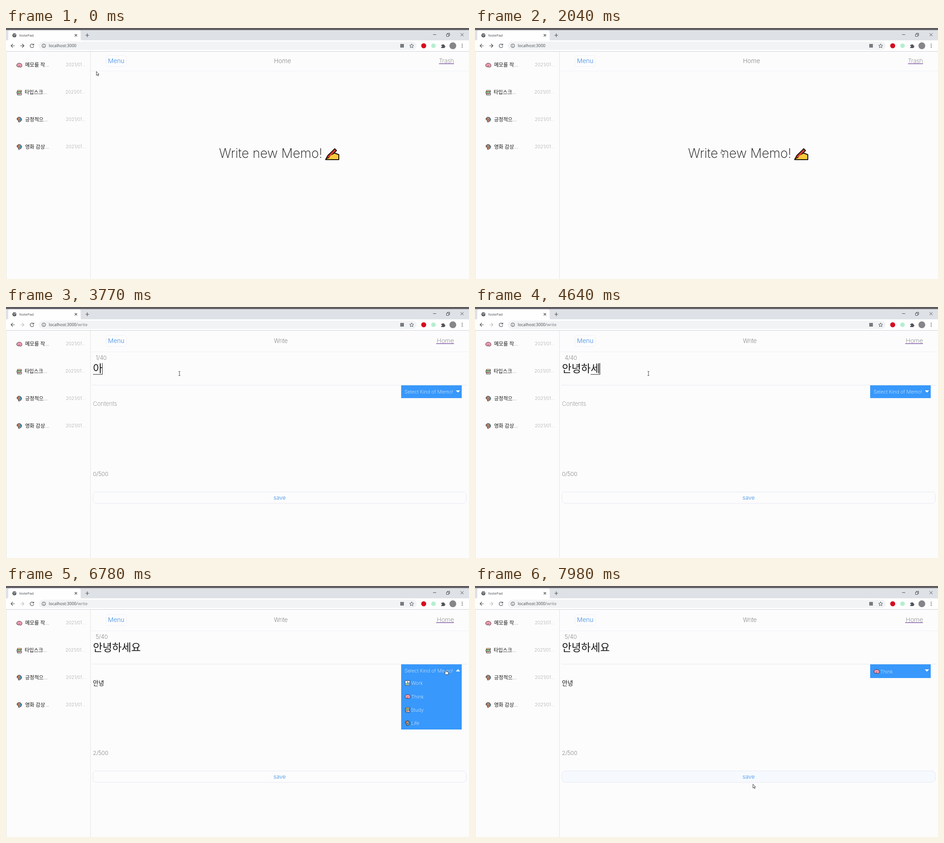
Animation, 1017 px wide and 551 px high, one loop 8 s. Source, as an HTML page:

```html
<!DOCTYPE html>
<html lang="ko">
<head>
<meta charset="utf-8">
<title>NotePad</title>
<style>
html, body { margin: 0; width: 100%; height: 100%; overflow: hidden; background: #fcfcfd; }
svg.stage { display: block; width: 100vw; height: 100vh; }
text { font-family: Inter, sans-serif; font-weight: 200; font-size: 13px; fill: #555; white-space: pre; }
.ui { font-family: "Open Sans", sans-serif; font-weight: 400; font-size: 9px; fill: #45484c; }
.ko { font-family: "Noto Sans CJK KR", "Noto Sans CJK JP", "Noto Sans CJK", sans-serif; font-weight: 300; font-size: 11px; fill: #151515; }
.soft { fill: #aaa; }
.date { font-size: 10px; fill: #888; }
.blue { fill: #3a8be4; font-weight: 300; }
.link { fill: #666; text-anchor: end; }
.rule { stroke: #551a8b; }
.hint { fill: #777; }
.pick text { font-size: 10.9px; fill: #fff; }
.thin { fill: none; stroke: #505357; stroke-width: 1.2; }
.edge { fill: none; stroke: #f0f1f6; }

.cursor { animation: travel 8s infinite ease-in-out; }
.home, .write, .closed, .open, .picked, .arrow, .beam, .hand { animation: 8s infinite step-end; }
.home { animation-name: home; }
.write { animation-name: write; }
.closed { animation-name: closed; }
.open { animation-name: open; }
.picked { animation-name: picked; }
.arrow { animation-name: arrow; }
.beam { animation-name: beam; }
.hand { animation-name: hand; }
.save { animation: hover 8s infinite linear; }

@keyframes home { 0% { opacity: 1 } 30%, 100% { opacity: 0 } }
@keyframes write { 0% { opacity: 0 } 30%, 100% { opacity: 1 } }
@keyframes closed { 0% { opacity: 1 } 83%, 100% { opacity: 0 } }
@keyframes open { 0% { opacity: 0 } 83% { opacity: 1 } 90.5%, 100% { opacity: 0 } }
@keyframes picked { 0% { opacity: 0 } 90.5%, 100% { opacity: 1 } }
@keyframes arrow { 0% { opacity: 1 } 18.5% { opacity: 0 } 97%, 100% { opacity: 1 } }
@keyframes beam { 0% { opacity: 0 } 30% { opacity: 1 } 78.5% { opacity: 0 } 92.5% { opacity: 1 } 97%, 100% { opacity: 0 } }
@keyframes hand { 0% { opacity: 0 } 18.5% { opacity: 1 } 30% { opacity: 0 } 78.5% { opacity: 1 } 92.5%, 100% { opacity: 0 } }
@keyframes hover { 0%, 97.5% { fill: #fcfcfd } 99%, 100% { fill: #f6fafe } }
@keyframes travel {
  0% { transform: translate(198px, 95px); animation-timing-function: ease-in }
  14.25% { transform: translate(398px, 184px); animation-timing-function: ease-out }
  21% { transform: translate(545px, 268px) }
  30% { transform: translate(540px, 266px) }
  33.9% { transform: translate(530px, 226px) }
  40%, 70% { transform: translate(381px, 146px); animation-timing-function: ease-in }
  73.5% { transform: translate(568px, 123px); animation-timing-function: ease-out }
  81.5% { transform: translate(960px, 186px) }
  84.75% { transform: translate(966px, 184px) }
  88.5% { transform: translate(912px, 240px) }
  91.5% { transform: translate(908px, 240px) }
  99.75%, 100% { transform: translate(610px, 434.5px) }
}
</style>
</head>
<body>
<svg class="stage" viewBox="0 0 1017 551">
  <defs>
    <g id="brain">
      <path d="M.8 7C0 4 2 1.300 6 1.300S12 3.500 12 6.500 10 10 8.500 10 7 9 5 9.300 1.200 9 .8 7Z" fill="#f4a3b8" stroke="#3a2028"/>
      <path d="M3 5.500q1.500-2 3 0t3-.8M4 7.500h4" fill="none" stroke="#b9647c" stroke-width=".8"/>
    </g>
    <g id="books">
      <path d="M2 1h9v3H2zM1 4h9v3.500H1zM2 7.500h9V11H2z" fill="#fff" stroke="#222"/>
      <path d="M2 1.800h8" stroke="#e9a025"/><path d="M1.500 5h6" stroke="#45ad4b" stroke-width="1.500"/><path d="M2.500 8.800h6" stroke="#dd5548"/>
    </g>
    <g id="person">
      <path d="M1 3.500 4 .8l4.500.3 3 3.400-.7 4L6.500 11.500 4 11 4.500 8 1.500 6.500Z" fill="#dc8c68" stroke="#242832"/>
      <path d="M6.500 1.500 10.800 4v4L8 9.500Z" fill="#3b95b3"/><path d="M2 4h3M5 6.500l2 1" stroke="#3c2625"/>
    </g>
    <g id="chart">
      <path d="M.8.800h10.400v10.400H.8Z" fill="#fff" stroke="#333"/>
      <path d="M3 10V6" stroke="#40a845" stroke-width="2"/><path d="M6 10V2.500" stroke="#df463c" stroke-width="2"/><path d="M9 10V4.500" stroke="#287cc9" stroke-width="2"/>
    </g>
  </defs>

  <!-- Browser window -->
  <rect width="1017" height="551" fill="#fcfcfd"/>
  <rect width="1017" height="27" fill="#dee1e6"/>
  <rect width="1017" height="4.500" fill="#5d5a60"/>
  <path d="M3 27q2 0 2-3V9q0-4 4-4h151q4 0 4 4v15q0 3 2 3v24H0V27Z" fill="#fefefe"/>
  <rect y="27" width="1017" height="24" fill="#fefefe"/>
  <rect x="72" y="30" width="830" height="18" rx="9" fill="#f1f3f4"/>
  <path d="M0 51.500h1017" stroke="#d0d2d4"/>
  <circle cx="18.500" cy="16" r="4.500" fill="#55595e"/>
  <path d="M15.500 14l2 1.500 1 2.500M19 12.500l.5 2 3 1" fill="none" stroke="#fff"/>
  <text class="ui" x="29" y="19" style="font-size:7.900px">NotePad</text>
  <g class="thin">
    <path d="M151 13.500l5 5m0-5l-5 5M174.500 16h8m-4-4v8"/>
    <path d="M938 14.500h7M998.500 11.500l6.500 6.500m0-6.500l-6.500 6.500" stroke-width="1"/>
    <path d="M967.500 13.500h5v5h-5zM969.500 13v-1.500h5v5H973" stroke-width="1"/>
    <path d="M19 39h-8m4-4l-4 4 4 4M60.200 36.600A4 4 0 1 0 61 40M61 34.500v3h-3"/>
    <circle cx="83" cy="39" r="4" stroke-width="1"/>
    <path d="M83 38.500v3m0-5v1" stroke-width="1"/>
    <path d="M891 34.800l1.300 2.900 3.100.3-2.300 2.100.7 3.100-2.800-1.600-2.800 1.600.7-3.100-2.300-2.100 3.100-.3Z" stroke-width="1"/>
  </g>
  <path d="M31.500 39h8m-4-4l4 4-4 4" fill="none" stroke="#bfc1c4" stroke-width="1.200"/>
  <text class="ui" x="94" y="42">localhost:3000</text>
  <rect x="866" y="35" width="8" height="8" fill="#777b80"/>
  <circle cx="917.500" cy="39" r="5.500" fill="#d50c1f"/>
  <circle cx="939" cy="39" r="5" fill="#b5efd0"/>
  <path d="M956 37h2.500a1.500 1.500 0 1 1 3 0h2v2.500a1.300 1.300 0 1 1 0 2.500v2H956v-2.300a1.300 1.300 0 1 0 0-2.500Z" fill="#505357"/>
  <circle cx="981.500" cy="39" r="7.500" fill="#85858a"/>
  <g fill="#505357"><circle cx="1002" cy="35.500" r="1"/><circle cx="1002" cy="39" r="1"/><circle cx="1002" cy="42.500" r="1"/></g>

  <!-- Memo list -->
  <path d="M.5 551V52.500M185.500 52v499" stroke="#e4e4dc"/>
  <use href="#brain" x="23" y="76"/>
  <use href="#books" x="23" y="136"/>
  <use href="#person" x="23" y="195"/>
  <use href="#person" x="23" y="255"/>
  <text class="ko" x="42" y="85">메모를 작<tspan class="soft">...</tspan></text>
  <text class="ko" x="41" y="145">타입스크<tspan class="soft">...</tspan></text>
  <text class="ko" x="42" y="204.500">긍정적으<tspan class="soft">...</tspan></text>
  <text class="ko" x="42" y="264.500">영화 감상<tspan class="soft">...</tspan></text>
  <text class="date" x="131.500" y="84">2021/01...</text>
  <text class="date" x="130.500" y="144">2021/01...</text>
  <text class="date" x="131.500" y="203.500">2021/01...</text>
  <text class="date" x="131.500" y="263.500">2021/01...</text>

  <g class="home">
    <path class="thin" d="M31.500 39h8m-4-4l4 4-4 4"/>
    <path class="edge" d="M186 94.500h831"/>
    <rect class="edge" x="219.500" y="60.500" width="45.500" height="24" rx="5"/>
    <text class="blue" x="224" y="77" style="font-size:13.500px">Menu</text>
    <text x="588.500" y="77" style="font-size:13.600px">Home</text>
    <text class="link" x="984" y="77">Trash</text>
    <path class="rule" d="M951 78.500h33"/>
    <text x="468" y="285" style="font-size:28.200px;font-weight:250;fill:#111">Write new Memo!</text>
    <path d="M702 289l5-9q4-5 10-6l6 1 8 3v11Z" fill="#fcc83b" stroke="#17130d" stroke-width="2" stroke-linejoin="round"/>
    <path d="M703 287l4-7 15-15 4 4-15 15Z" fill="#dc3c32" stroke="#17130d" stroke-width="1.800" stroke-linejoin="round"/>
    <path d="M709 286l4-6 6-3 5 1-6 6Z" fill="#fcc83b"/>
  </g>

  <g class="write">
    <text class="ui" x="154.500" y="42" style="fill:#777b80">/write</text>
    <path class="edge" d="M186 98.500h831"/>
    <path d="M190 171.500h822" stroke="#e6e7ed"/>
    <rect class="edge" x="219.500" y="62.500" width="45.500" height="24" rx="5"/>
    <text class="blue" x="224" y="79" style="font-size:13.500px">Menu</text>
    <text x="588.500" y="79">Write</text>
    <text class="link" x="984" y="79" style="font-size:13.600px">Home</text>
    <path class="rule" d="M945 80.500h39"/>

    <text id="titleCount" x="197" y="116" style="font-size:12.500px">0/40</text>
    <text id="titleHint" class="hint" x="190.500" y="140" style="font-size:20.800px">Title</text>
    <text id="title" class="ko" x="191" y="142.500" style="font-size:22.800px"></text>
    <path id="titleLine" stroke="#222"/>
    <path id="titleCaret" stroke="#222"/>

    <text id="bodyHint" class="hint" x="191" y="217">Contents</text>
    <text id="body" class="ko" x="191" y="217.500" style="font-size:13.300px"></text>
    <path id="bodyLine" stroke="#222"/>
    <path id="bodyCaret" stroke="#222"/>
    <text id="bodyCount" x="191" y="370.500" style="font-size:12.400px">0/500</text>

    <rect class="save" x="191" y="406" width="820" height="25" rx="7" stroke="#e6e8f0"/>
    <text class="blue" x="601" y="423" text-anchor="middle" style="font-size:12.400px">save</text>

    <g class="pick closed">
      <rect x="868" y="172" width="133" height="28" fill="#3898fb"/>
      <text x="875.500" y="190">Select Kind of Memo!</text>
      <path d="M988 183h9.500l-4.750 5Z" fill="#fff"/>
    </g>
    <g class="pick open">
      <rect x="868" y="172" width="133" height="143" fill="#3898fb"/>
      <text x="875.500" y="190">Select Kind of Memo!</text>
      <path d="M988 187.500h9.500l-4.750-5Z" fill="#fff"/>
      <use href="#chart" x="876" y="207"/><text x="890" y="217">Work</text>
      <use href="#brain" x="876" y="237"/><text x="890" y="246.500">Think</text>
      <use href="#books" x="876" y="266"/><text x="889" y="275.500">Study</text>
      <use href="#person" x="876" y="295"/><text x="890" y="304.500">Life</text>
    </g>
    <g class="pick picked">
      <rect x="868" y="172" width="133" height="30" fill="#3898fb"/>
      <use href="#brain" x="876" y="182"/><text x="890" y="191.500">Think</text>
      <path d="M988 183h9.500l-4.750 5Z" fill="#fff"/>
    </g>
  </g>

  <g class="cursor">
    <path class="arrow" d="M.5.500v8.500l2-1.900 1.500 3.200 1.300-.6-1.500-3.100h2.500Z" fill="#fff" stroke="#333" stroke-width=".9"/>
    <path class="beam" d="M-2-4.500h1.500l.5.500.5-.5H2M0-4v8M-2 4.500h1.500L0 4l.5.500H2" fill="none" stroke="#333" stroke-width=".9"/>
    <path class="hand" d="M-1 1q0-1 .9-1T1 1v3l4 .8q1 .3 1 1.500L5 10.500H0L-3 7q0-1.500 2-.5Z" fill="#fff" stroke="#333" stroke-width=".9"/>
  </g>
</svg>
<script>
const LOOP = 8000;
const BLINK = 500;
const byId = id => document.getElementById(id);

const fields = [
  { name: 'title', limit: 40, start: 3660, gap: 105, focus: [[3300, 5280]], top: 123, bottom: 148,
    steps: 'ㅇ 아 안 안ㄴ 안녀 안녕 안녕ㅎ 안녕하 안녕핫 안녕하세 안녕하셍 안녕하세요'.split(' ') },
  { name: 'body', limit: 500, start: 5360, gap: 95, focus: [[2400, 3300], [5280, 6500]], top: 205, bottom: 220.5,
    steps: 'ㅇ 아 안 안ㄴ 안녀 안녕'.split(' ') }
];
for (const f of fields) {
  f.text = byId(f.name);
  for (const part of ['Hint', 'Count', 'Line', 'Caret']) f[part] = byId(f.name + part);
}

function drawField(f, t) {
  const step = Math.min(Math.floor((t - f.start) / f.gap), f.steps.length - 1);
  const typed = f.steps[step] || '';
  const focus = f.focus.find(([from, to]) => t >= from && t < to);
  const caretOn = focus && (typed || (t - focus[0]) % (2 * BLINK) < BLINK);
  if (f.text.textContent !== typed) f.text.textContent = typed;
  f.Hint.style.display = typed ? 'none' : '';
  f.Count.textContent = `${typed.length}/${f.limit}`;

  const width = typed ? f.text.getComputedTextLength() : 0;
  const end = 191 + width;
  const glyph = typed ? width / typed.length : 0;
  f.Caret.setAttribute('d', caretOn ? `M${Math.floor(end) + .5} ${f.top}V${f.bottom}` : '');
  f.Line.setAttribute('d', focus && typed ? `M${end - glyph} ${f.bottom}H${end}` : '');
}

const begin = performance.now();
function tick() {
  const t = (performance.now() - begin) % LOOP;
  fields.forEach(f => drawField(f, t));
  requestAnimationFrame(tick);
}
tick();
</script>
</body>
</html>
```
